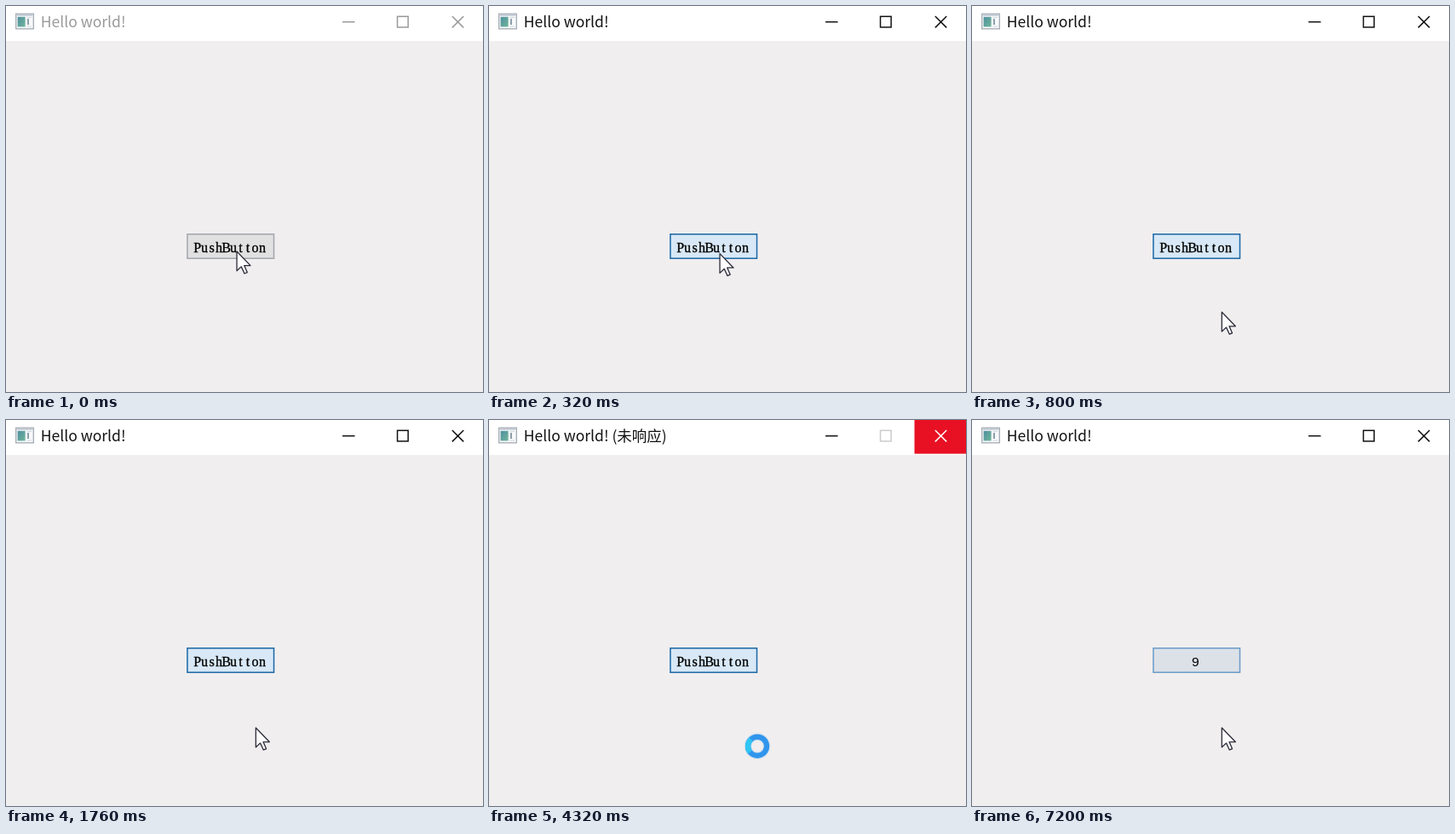
Recreate the animation shown at these times as an HTML page. Size 560x453 px, loop 7360 ms.

```html
<!DOCTYPE html>
<html lang="zh-CN">
<meta charset="utf-8">
<title>Hello world!</title>
<style>
  html, body { margin: 0; height: 100%; overflow: hidden; background: #f0eeef; }
  svg { display: block; width: 100vw; height: 100vh; }
  #title { font: 17.5px "Noto Sans CJK SC", "Noto Sans CJK", sans-serif; white-space: pre; }
  #label { font: 16px "Liberation Serif", serif; text-anchor: middle; stroke: #000; stroke-width: .35; }
  #count { font: 15.5px "Liberation Sans", sans-serif; text-anchor: middle; }
  .line { fill: none; stroke-width: 1.5; }
</style>
<svg viewBox="0 0 560 453">
  <defs>
    <linearGradient id="pane" x2="1" y2="1">
      <stop stop-color="#4f8fa0"/><stop offset="1" stop-color="#6fb59a"/>
    </linearGradient>
  </defs>
  <rect width="560" height="453" fill="#f0eeef"/>
  <rect width="560" height="41" fill="#fff"/>

  <g id="icon">
    <rect x="11.7" y="9.2" width="20.6" height="17.6" fill="#f7f9fa" stroke="#a4abb3" stroke-width="1.3"/>
    <path d="M12.5 10.8H31.5" stroke="#c6ced8" stroke-width="2"/>
    <rect x="13.6" y="12.8" width="9" height="11.6" fill="url(#pane)"/>
    <path d="M24.5 13.5H30M24.5 24H30" stroke="#d3d8dc" stroke-width="1"/>
    <path d="M26 15V22" stroke="#8fa1ac" stroke-width="2"/>
  </g>

  <text id="title" x="40.8" y="25.3"></text>
  <rect id="alert" x="499.5" width="60.5" height="39.6" fill="#e81123"/>
  <path id="min" class="line" d="M395 18.7H409.5"/>
  <rect id="max" class="line" x="459.5" y="12.3" width="12.6" height="12.6"/>
  <path id="close" class="line" d="M523.8 12L537.2 25.4M537.2 12L523.8 25.4"/>

  <rect id="button" x="212.9" y="267.8" width="101.6" height="28.4" stroke-width="1.5"/>
  <g id="label"></g>
  <text id="count" x="262.3" y="288.6">9</text>

  <path id="cursor" d="M0 0V22.8L5.2 17.9L9 26L12.2 24.6L8.7 16.6H16Z"
        fill="#fff" stroke="#2b2b38" stroke-width="1.3" stroke-linejoin="round"/>
  <g id="busy" transform="translate(315 382.8)" fill="none">
    <circle r="11" stroke="#cfdeec" stroke-width="8.4"/>
    <circle r="11" stroke="#2f95ec" stroke-width="6.2"/>
    <path d="M-8.6 6.9A11 11 0 0 1 -7.4 -8.1" stroke="#2fc5f3" stroke-width="6.2"/>
  </g>
</svg>
<script>
  const LOOP = 7360;
  const el = id => document.getElementById(id);
  const set = (id, attrs) => Object.entries(attrs).forEach(([k, v]) => el(id).setAttribute(k, v));
  const show = (id, on) => set(id, { visibility: on ? 'visible' : 'hidden' });

  // The button caption sits on a fixed character grid.
  el('label').innerHTML = [...'PushButton']
    .map((c, i) => `<text x="${224.6 + i * 8.5}" y="288.7">${c}</text>`).join('');

  // [start time, x, y]
  const cursorStops = [
    [0, 271, 288], [320, 271, 290.6], [480, 293.3, 360],
    [800, 293.3, 359.2], [1760, 293.3, 361.2]
  ];

  function draw(t) {
    const active = t >= 320;
    const hung = t >= 4320 && t < 7200;
    const done = t >= 7200;
    const ink = active ? '#111' : '#999';

    el('title').textContent = 'Hello world!' + (hung ? ' (未响应)' : '');
    set('title', { fill: ink });
    set('min', { stroke: ink });
    set('max', { stroke: hung ? '#ccc' : ink });
    set('close', { stroke: hung ? '#fff' : ink });
    show('alert', hung);

    const [fill, stroke] = done ? ['#dce1e8', '#6a9cc9']
      : t >= 160 ? ['#d8e8f6', '#1a67a6'] : ['#e1e1e1', '#a3a6ab'];
    set('button', { fill, stroke });
    show('label', !done);
    show('count', done);

    const [, x, y] = cursorStops.findLast(stop => t >= stop[0]);
    set('cursor', { transform: `translate(${x} ${y})` });
    show('cursor', !hung);
    show('busy', hung);
  }

  const start = performance.now();
  function tick() {
    draw((performance.now() - start) % LOOP);
    requestAnimationFrame(tick);
  }
  tick();
</script>
</html>
```
